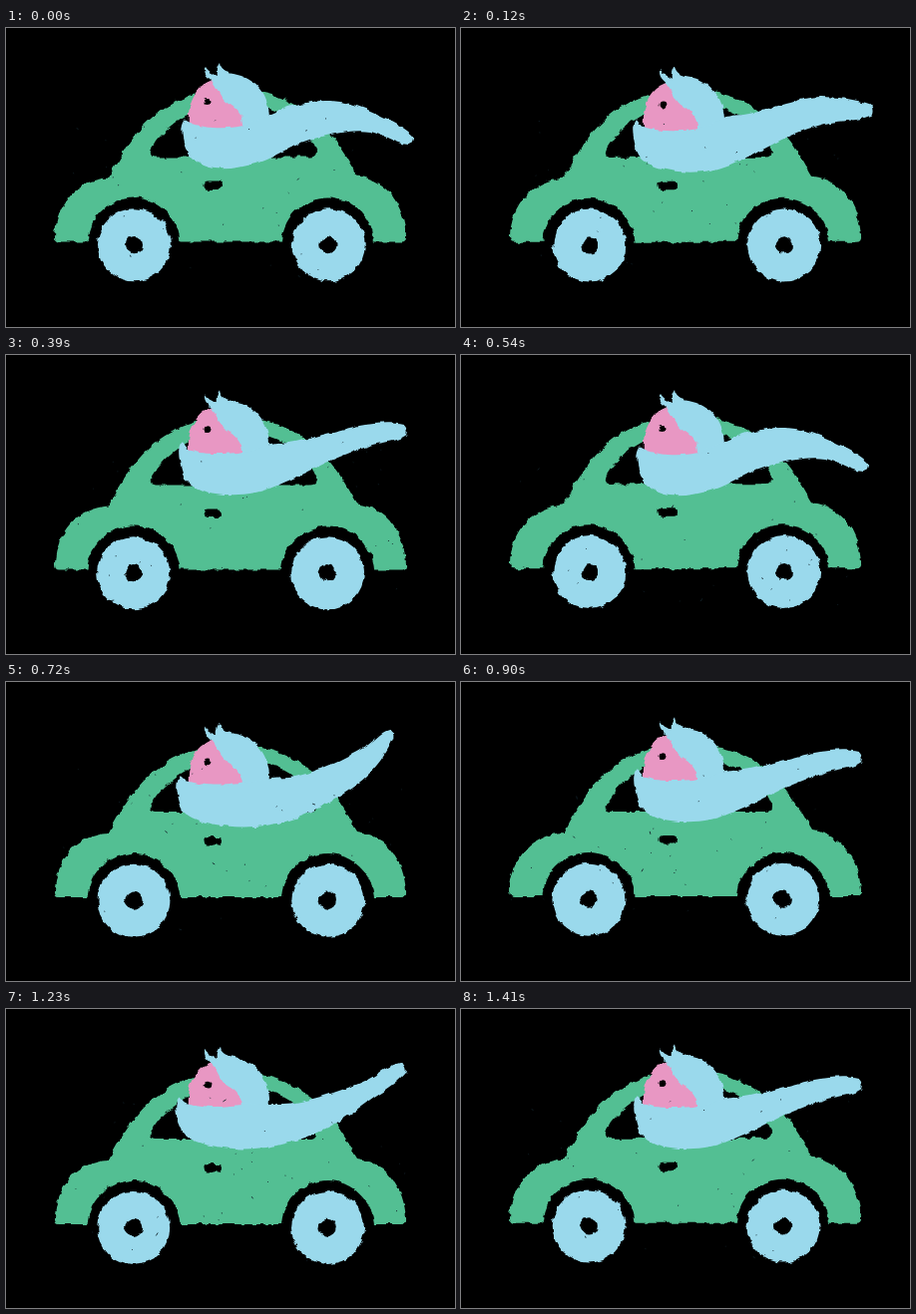
Write an HTML page that moves like this. It is 450x300 px and loops after 1440 ms.

```html
<!DOCTYPE html>
<html lang="en">
<head>
<meta charset="utf-8">
<title>Bird in a car</title>
<style>
  html, body { margin: 0; width: 100%; height: 100%; overflow: hidden; background: #000; }
  svg { display: block; width: 100vw; height: 100vh; }
  .green { fill: #53bf93; }
  .blue { fill: #9ad9ec; }
  .pink { fill: #e897c3; }
</style>
</head>
<body>
<svg viewBox="0 0 450 300">
  <defs>
    <filter id="roughCar" filterUnits="userSpaceOnUse" x="0" y="0" width="450" height="300" color-interpolation-filters="sRGB">
      <feTurbulence type="fractalNoise" baseFrequency=".11" numOctaves="2" result="n"/>
      <feDisplacementMap in="SourceGraphic" in2="n" scale="6" xChannelSelector="R" yChannelSelector="G"/>
      <feGaussianBlur stdDeviation=".4"/>
    </filter>
    <filter id="roughBird" filterUnits="userSpaceOnUse" x="0" y="0" width="450" height="300" color-interpolation-filters="sRGB">
      <feTurbulence type="fractalNoise" baseFrequency=".11" numOctaves="2" result="n"/>
      <feDisplacementMap in="SourceGraphic" in2="n" scale="5" xChannelSelector="R" yChannelSelector="G"/>
      <feGaussianBlur stdDeviation=".4"/>
    </filter>
  </defs>
  <rect width="450" height="300"/>
  <g filter="url(#roughCar)">
    <g id="car">
      <path class="green" d="M53 215 Q49 215 49 210 C50 176 72 153 103 151 C124 112 150 64 225 62 C300 62 330 108 352 149 C382 153 399 178 401 209 Q402 215 396 215 Z"/>
      <path d="M150 130 Q142 129 146 121 C160 98 185 78 228 76 C270 76 300 95 311 122 Q312 130 305 130 Z"/>
      <circle cx="128" cy="217.5" r="46.5"/>
      <circle cx="322.5" cy="217.5" r="46.5"/>
      <rect x="198.5" y="154" width="18.5" height="8.5" rx="3.8"/>
    </g>
    <g id="wheels">
      <circle class="blue" cx="128" cy="218.5" r="36.5"/>
      <circle class="blue" cx="322.8" cy="218.5" r="36.5"/>
      <circle cx="128" cy="218.4" r="8.6"/>
      <circle cx="322.4" cy="218.4" r="8.6"/>
    </g>
  </g>
  <g filter="url(#roughBird)">
    <g id="head">
      <path class="pink" d="M184 104 C179 76 190 57 208 52 L240 60 V104 Z"/>
      <path class="blue" d="M207 54 C203 49 198 47 199 39 C202 44 207 46 211 48 C210 43 212 38 214 35 C215 42 220 45 228 46 C250 50 263 67 264 88 L262 112 H237 V97 C237 88 231 80 223 76 C214 71 213 61 207 54 Z"/>
      <circle cx="202" cy="74.3" r="3.4"/>
    </g>
    <path id="scarf" class="blue"/>
  </g>
  <path id="specks" fill="none" stroke="#12222a" stroke-linecap="round" stroke-width=".9"/>
</svg>
<script>
const STEP = 30, CYCLE = 16, LOOP = 48;
const LOW_X = [365, 330, 290, 250, 210], TOP_X = [266, 290, 325, 360];

// head drop, collar left/top/dip, tip corners, lower edge, upper edge
const poses = [
  { drop: 0,   collar: [177, 92, 100],   tip: [407, 107, 403, 117], low: [104, 106, 118, 136, 141], top: [86, 77, 73, 81] },
  { drop: 2.7, collar: [173, 92, 103],   tip: [411, 77, 411, 88],   low: [96, 108, 128, 143, 143],  top: [89, 86, 76, 69] },
  { drop: 5.5, collar: [172, 95, 103.5], tip: [384, 48, 388, 57],   low: [91, 117, 137, 145, 143],  top: [97, 95, 83, 65] },
  { drop: 1.8, collar: [171, 89, 98],    tip: [395, 54, 400, 64],   low: [91, 115, 132, 140, 138],  top: [95, 94, 85, 72] },
  { drop: 0.3, collar: [174, 88, 99],    tip: [398, 70, 400, 81],   low: [91, 104, 123, 138, 139],  top: [90, 87, 78, 70] }
];

const el = id => document.getElementById(id);
const car = el('car'), wheels = el('wheels'), head = el('head');
const scarf = el('scarf'), specks = el('specks');
const carNoise = document.querySelector('#roughCar feTurbulence');
const birdNoise = document.querySelector('#roughBird feTurbulence');

// Closed Catmull-Rom curve through the points
function smooth(pts) {
  const n = pts.length, at = i => pts[(i + n) % n];
  let d = `M${pts[0]}`;
  for (let i = 0; i < n; i++) {
    const [a, b, c, e] = [at(i - 1), at(i), at(i + 1), at(i + 2)];
    const span = Math.hypot(c[0] - b[0], c[1] - b[1]);
    const handle = (p, q, k) => {
      const len = Math.hypot(q[0] - p[0], q[1] - p[1]) || 1;
      return [0, 1].map(j => (q[j] - p[j]) / len * span / 3 * k);
    };
    const u = handle(a, c, 1), v = handle(b, e, -1);
    d += `C${b[0] + u[0]} ${b[1] + u[1]} ${c[0] + v[0]} ${c[1] + v[1]} ${c}`;
  }
  return d + 'Z';
}

function scarfPath({ collar: [x, y, dip], tip, low, top }) {
  return smooth([
    [x + 2, y], [x + 9, dip - 4], [207, dip], [238, dip - 2],
    ...TOP_X.map((px, i) => [px, top[i]]),
    [tip[0], tip[1]], [tip[2], tip[3]],
    ...LOW_X.map((px, i) => [px, low[i]]),
    [x + 9, low[4] - 11], [x, y + 18]
  ]);
}
const scarfs = poses.map(scarfPath);

function random(seed) {
  return () => {
    seed = (seed * 1664525 + 1013904223) >>> 0;
    return seed / 4294967296;
  };
}

function speckPath(seed) {
  const r = random(seed * 7919 + 11);
  r();
  let d = '';
  for (let i = 0; i < 34; i++) {
    const len = r() < .12 ? 4 : .5;
    d += `M${50 + r() * 350} ${85 + r() * 168}l${(r() - .3) * len} ${(r() - .6) * len}`;
  }
  return d;
}

function draw(frame) {
  const phase = frame % CYCLE;
  const turn = 2 * Math.PI / CYCLE;
  const bob = -.9 * Math.cos((phase - 1.5) * turn);
  const sway = .2 + .7 * Math.sin((phase + 1) * turn);
  const pose = Math.min(4, Math.floor((phase + .7) * 5 / CYCLE));
  const boil = Math.floor((phase + 1) % CYCLE / 3);

  car.setAttribute('transform', `translate(0 ${bob + .2})`);
  wheels.setAttribute('transform', `translate(${sway} ${bob})`);
  head.setAttribute('transform', `translate(0 ${poses[pose].drop})`);
  scarf.setAttribute('d', scarfs[pose]);
  carNoise.setAttribute('seed', boil + 3);
  birdNoise.setAttribute('seed', pose + 20);
  specks.setAttribute('d', speckPath(Math.floor((frame + 1) % LOOP / 3)));
}

const start = performance.now();
let shown = -1;
function tick() {
  const frame = Math.floor((performance.now() - start) / STEP) % LOOP;
  if (frame !== shown) draw(shown = frame);
  requestAnimationFrame(tick);
}
tick();
</script>
</body>
</html>
```
